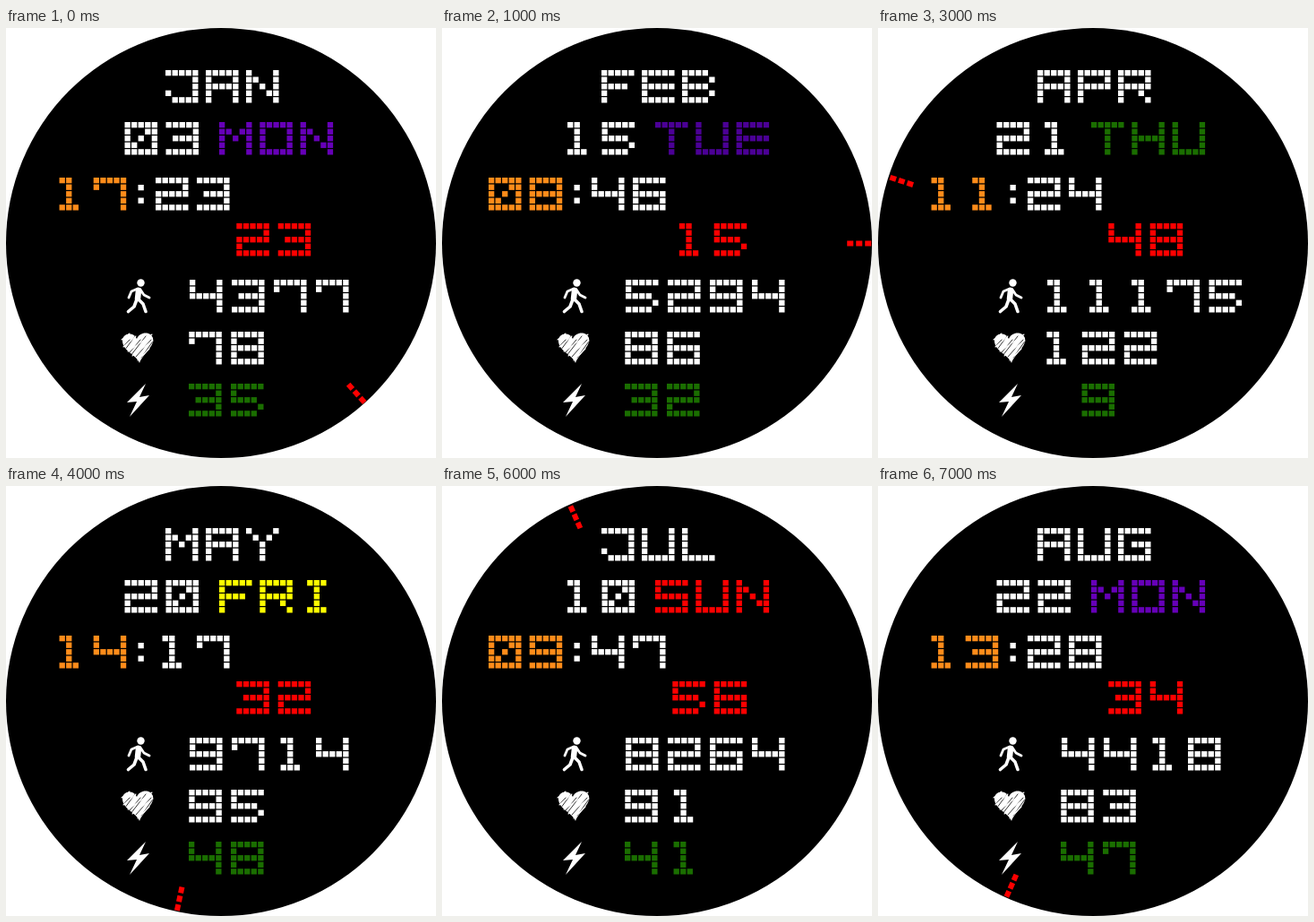
Write an HTML page with a canvas that moves like this. It is 480x480 px and loops after 8 s.

```html
<!DOCTYPE html>
<html lang="en">
<head>
<meta charset="utf-8">
<title>Pixel watch face</title>
<style>
  html, body { margin: 0; width: 100%; height: 100%; overflow: hidden; background: #fff; }
  canvas { display: block; width: 480px; height: 480px; }
</style>
</head>
<body>
<canvas id="stage" width="480" height="480"></canvas>
<script>
const ctx = document.getElementById('stage').getContext('2d');
const PITCH = 7.55, CELL = 6.3;
const WHITE = '#fff', RED = '#f00', ORANGE = '#ff8c1a', GREEN = '#1a6e00';

// Five rows per glyph
const GLYPHS = {
  0: '##### #..## #.#.# ##..# #####',
  1: '.##.. ..#.. ..#.. ..#.. .###.',
  2: '##### ....# ##### #.... #####',
  3: '##### ....# .#### ....# #####',
  4: '#...# #...# ##### ....# ....#',
  5: '##### #.... ####. ....# ####.',
  6: '##### #.... ##### #...# #####',
  7: '##### #...# ....# ....# ....#',
  8: '##### #...# ##### #...# #####',
  9: '##### #...# ##### ....# #####',
  A: '##### #...# ##### #...# #...#',
  B: '####. #...# ####. #...# ####.',
  D: '####. #...# #...# #...# ####.',
  E: '##### #.... ##### #.... #####',
  F: '##### #.... ####. #.... #....',
  G: '##### #.... #.### #...# #####',
  H: '#...# #...# ##### #...# #...#',
  I: '.###. ..#.. ..#.. ..#.. .###.',
  J: '##### ....# ....# #...# .####',
  L: '#.... #.... #.... #.... #####',
  M: '#...# ##.## #.#.# #...# #...#',
  N: '#...# ##..# #.#.# #..## #...#',
  O: '##### #...# #...# #...# #####',
  P: '##### #...# ##### #.... #....',
  R: '##### #...# ##### #..#. #...#',
  S: '##### #.... ##### ....# #####',
  T: '##### ..#.. ..#.. ..#.. ..#..',
  U: '#...# #...# #...# #...# #####',
  W: '#...# #...# #.#.# #.#.# .#.#.',
  Y: '#...# .#.#. ..#.. ..#.. ..#..'
};

const DAY_COLORS = {
  MON: '#6600b8', TUE: '#4b0096', WED: '#0000ff', THU: GREEN,
  FRI: '#ffff00', SAT: ORANGE, SUN: RED
};

// month, date, weekday, hour, minute, second, steps, pulse, battery
const READINGS = [
  'JAN 03 MON 17 23 23 4377 78 35',
  'FEB 15 TUE 08 46 15 5294 86 32',
  'MAR 09 WED 07 38 02 3768 75 36',
  'APR 21 THU 11 24 48 11175 122 9',
  'MAY 20 FRI 14 17 32 9714 95 48',
  'JUN 25 SAT 00 04 56 4173 174 43',
  'JUL 10 SUN 09 47 56 8264 91 41',
  'AUG 22 MON 13 28 34 4418 83 47'
].map(line => line.split(' '));

function drawText(text, x, y, color, advance) {
  ctx.fillStyle = color;
  [...text].forEach((char, i) => {
    GLYPHS[char].split(' ').forEach((row, r) => {
      [...row].forEach((bit, c) => {
        if (bit === '#') {
          ctx.fillRect(x + i * advance + c * PITCH, y + r * PITCH, CELL, CELL);
        }
      });
    });
  });
}

function drawCentered(text, center, y, color) {
  drawText(text, center - text.length * 23.5, y, color, 47);
}

function strokePath(d, width, color = WHITE) {
  ctx.lineWidth = width;
  ctx.strokeStyle = color;
  ctx.stroke(new Path2D(d));
}

function drawWalker() {
  ctx.lineCap = ctx.lineJoin = 'round';
  ctx.fillStyle = WHITE;
  ctx.beginPath();
  ctx.arc(150.5, 284.5, 4.2, 0, 7);
  ctx.fill();
  strokePath('M148 293L147 302', 6.5);
  strokePath('M147 291L140 294L137 301M150 292L154 298L160 301', 2.8);
  strokePath('M147 302L153 308L156 316.5M146 303L143 311L136.5 316.5', 3.6);
}

function drawHeart() {
  const heart = new Path2D('M149 374C146 365 131 361 130 350C129 341 142 338 146 347C149 339 161 338 164 346C166 356 153 363 149 374Z');
  ctx.fillStyle = WHITE;
  ctx.fill(heart);
  ctx.save();
  ctx.clip(heart);
  for (let i = 0; i < 8; i++) {
    const x = 121 + i * 6;
    strokePath(`M${x} ${366 + i % 3}L${x + 17} ${348 - i % 2 * 4}`, 0.8, '#000');
  }
  ctx.restore();
  strokePath('M129 348L138 341M131 356L145 344M136 361L163 342M141 366L164 349M147 371L160 358', 1.1);
}

function drawBolt() {
  ctx.fillStyle = WHITE;
  ctx.fill(new Path2D('M156 397L135 418L146 417L138 434L160 410L149 412Z'));
}

function drawHand(second) {
  ctx.save();
  ctx.translate(240.5, 240.5);
  ctx.rotate(second * Math.PI / 30);
  ctx.fillStyle = RED;
  for (const radius of [235.2, 225.2, 215.2]) ctx.fillRect(-3, -radius - 3.5, 6, 7);
  ctx.restore();
}

function drawFace(reading) {
  const [month, date, day, hour, minute, second, steps, pulse, battery] = reading;
  ctx.fillStyle = WHITE;
  ctx.fillRect(0, 0, 480, 480);
  ctx.fillStyle = '#000';
  ctx.beginPath();
  ctx.arc(240, 240, 240, 0, Math.PI * 2);
  ctx.fill();

  drawText(month, 178, 47, WHITE, 45);
  drawText(date, 132.5, 105, WHITE, 46);
  drawText(day, 238, 105, DAY_COLORS[day], 45.3);
  drawText(hour, 52, 167, ORANGE, 45.7);
  drawText(minute, 167, 167, WHITE, 46);
  ctx.fillStyle = WHITE;
  for (const y of [175, 189.5]) ctx.fillRect(147.5, y, CELL, CELL);
  drawText(second, 257.3, 218, RED, 46.4);

  drawWalker();
  drawHeart();
  drawBolt();
  drawCentered(steps, 299, 281, WHITE);
  drawCentered(pulse, 251.3, 339, WHITE);
  drawCentered(battery, 251, 397, GREEN);
  drawHand(+second);
}

const start = performance.now();
function tick() {
  const elapsed = performance.now() - start;
  drawFace(READINGS[Math.floor(elapsed / 1000) % READINGS.length]);
  requestAnimationFrame(tick);
}
tick();
</script>
</body>
</html>
```
